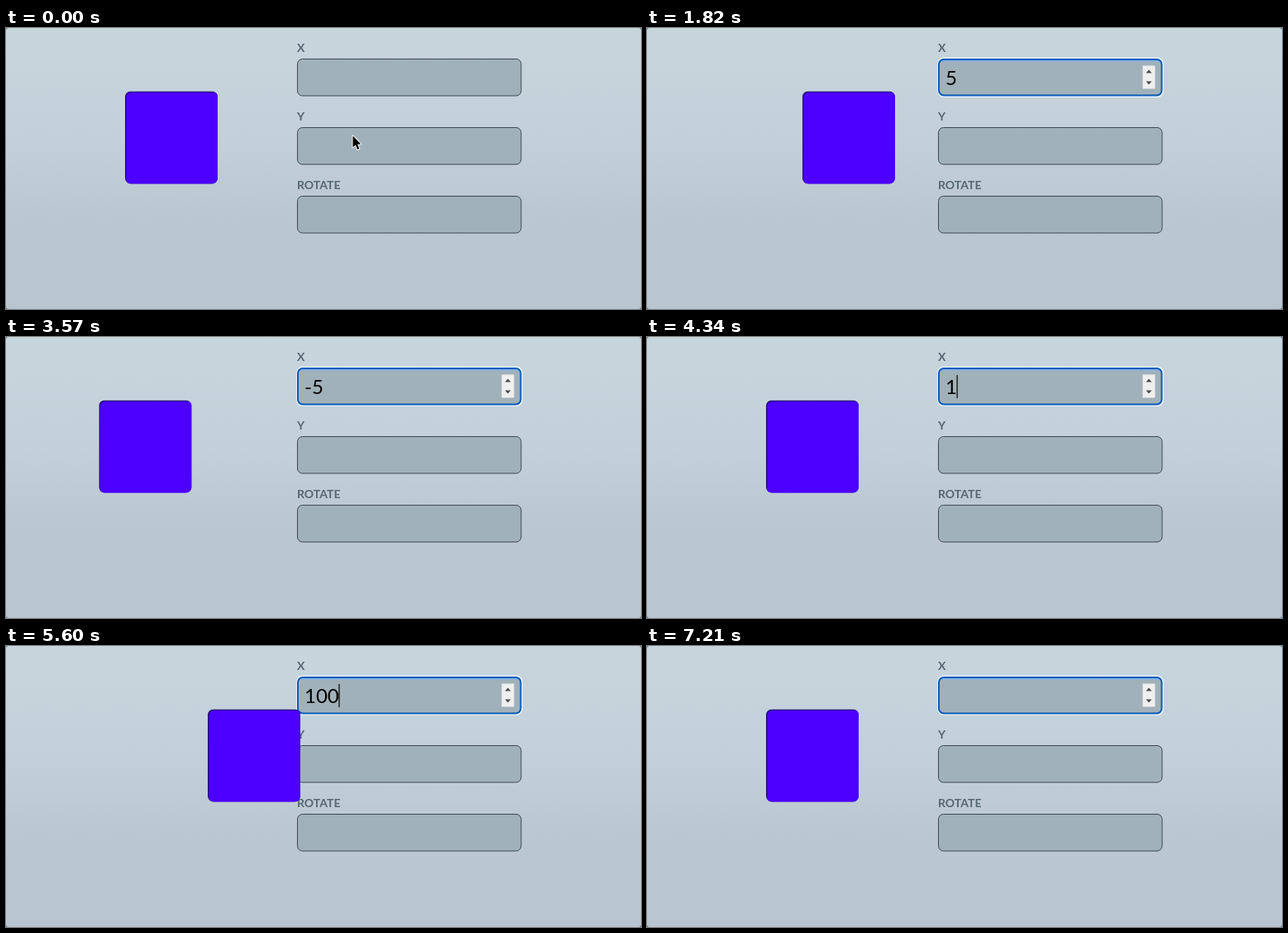
Animation of 768x340 px, one loop 7280 ms. Source, as an HTML page with a canvas:

```html
<!DOCTYPE html>
<html lang="en">
<head>
<meta charset="utf-8">
<title>Move a square by number</title>
<style>
  html, body { margin: 0; width: 768px; height: 340px; overflow: hidden; background: #56646d; }
  canvas { display: block; }
</style>
</head>
<body>
<canvas id="stage" width="768" height="340"></canvas>
<script>
const ctx = document.getElementById('stage').getContext('2d');
const LOOP = 7280, STEP = 70, MOVE = 500;
const LABELS = ['X', 'Y', 'ROTATE'];
const FIELD = { x: 352, y: 37, w: 271.5, h: 45.5, pitch: 83 };

// Each keystroke: time and the text it leaves in the first field
const KEYS = [
  [1120, '5'], [1230, '50'], [1805, '5'], [1890, ''],
  [2520, '-'], [2940, '-5'], [3000, '-50'], [3520, '-5'], [3660, '-'], [3800, ''],
  [4340, '1'], [4480, '10'], [4635, '100'], [5745, '10'], [5930, '1'], [6140, '']
];
const CARET = [[420, 910], [1120, 1770], [2240, 3560], [4060, 5110], [5600, 6230], [6720, 7210]];

const clamp = v => Math.max(0, Math.min(1, v));
const mix = (a, b, p) => a + (b - a) * p;
const easeInOut = p => p * p * (3 - 2 * p);
const backOut = p => 1 + (p - 1) ** 2 * (2.7 * (p - 1) + 1.7);

function offsetAt(t) {
  let from = 0, to = 0, start = -MOVE;
  const at = time => mix(from, to, backOut(clamp((time - start) / MOVE)));
  for (const [time, text] of KEYS) {
    if (time > t) break;
    const next = Number(text) || 0;
    if (next === to) continue;
    from = at(time);
    to = next;
    start = time;
  }
  return at(t);
}

function textAt(t) {
  let text = '';
  for (const [time, value] of KEYS) if (time <= t) text = value;
  return text;
}

function pointerAt(t) {
  if (t < 1120) return { x: mix(419.5, 418, clamp(t / 350)), y: mix(130.5, 60, easeInOut(clamp(t / 350))) };
  if (t < 6510 || t > 6790) return null;
  const p = clamp((t - 6440) / 350);
  return { x: mix(418, 352, p), y: mix(60, 345, p ** 1.3) };
}

function box(x, y, w, h, r) {
  ctx.beginPath();
  ctx.roundRect(x, y, w, h, r);
}

function polygon(points) {
  ctx.beginPath();
  points.forEach(([x, y]) => ctx.lineTo(x, y));
  ctx.closePath();
}

function drawBackground() {
  const shade = ctx.createLinearGradient(0, 0, 0, 340);
  shade.addColorStop(0, '#c7d5dd');
  shade.addColorStop(0.4, '#c3d0d9');
  shade.addColorStop(0.65, '#bbc8d2');
  shade.addColorStop(1, '#b8c5d0');
  ctx.fillStyle = '#56646d';
  ctx.fillRect(0, 0, 768, 340);
  ctx.fillStyle = shade;
  box(0, 0, 768, 340, 3);
  ctx.fill();
}

function drawSpinner(y) {
  ctx.fillStyle = '#efefef';
  ctx.fillRect(599.5, y + 8.5, 15, 28);
  ctx.fillStyle = '#4a4a4a';
  for (const [base, dir] of [[y + 17.5, -1], [y + 27.5, 1]]) {
    polygon([[603.5, base], [610.5, base], [607, base + 4 * dir]]);
    ctx.fill();
  }
}

function drawField(i, focused, hovered) {
  const { x, w, h } = FIELD, y = FIELD.y + i * FIELD.pitch;
  ctx.font = '700 14px Lato, sans-serif';
  ctx.fillStyle = '#566771';
  ctx.fillText(LABELS[i], x, y - 8);

  if (focused) {
    ctx.fillStyle = '#e6f0f8';
    box(x - 1, y - 1.5, w + 2.5, h + 3, 7.5);
    ctx.fill();
  }
  ctx.fillStyle = '#a1b1b9';
  box(x + 0.5, y + 0.5, w - 1, h - 1, 6);
  ctx.fill();
  if (focused) {
    ctx.fillStyle = '#86b0e0';
    ctx.fillRect(x + 4, y + 2, w - 8, 2);
  }
  ctx.strokeStyle = focused ? '#0b5cb8' : '#3c494f';
  ctx.lineWidth = focused ? 2 : 1;
  box(x + (focused ? 1 : 0.5), y + (focused ? 1 : 0.5), w - (focused ? 2 : 1), h - (focused ? 2 : 1), 6);
  ctx.stroke();
  if (focused || hovered) drawSpinner(y);
}

function drawValue(text, caret) {
  ctx.font = '24px Lato, sans-serif';
  ctx.fillStyle = '#000';
  ctx.fillText(text, 361, 69);
  if (caret) ctx.fillRect(360.6 + ctx.measureText(text).width, 46, 1.2, 28);
}

function drawSquare(x) {
  const y = 76.5, size = 112;
  ctx.save();
  box(x, y, size, size, 7);
  ctx.clip();
  ctx.fillStyle = '#220a78';
  ctx.fillRect(x, y, size, size);
  ctx.fillStyle = '#4c00ff';
  box(x + 1.4, y + 1.4, size, size, 6);
  ctx.fill();
  ctx.restore();
}

function drawPointer({ x, y }, beam) {
  ctx.save();
  ctx.translate(x, y);
  ctx.lineJoin = 'round';
  if (beam) {
    ctx.beginPath();
    for (const s of [-1, 1]) {
      ctx.moveTo(-3, 8 * s);
      ctx.quadraticCurveTo(0, 8 * s, 0, 5 * s);
      ctx.quadraticCurveTo(0, 8 * s, 3, 8 * s);
    }
    ctx.moveTo(0, -6);
    ctx.lineTo(0, 6);
    for (const [color, width] of [['#ffffffaa', 2.4], ['#111', 1]]) {
      ctx.strokeStyle = color;
      ctx.lineWidth = width;
      ctx.stroke();
    }
  } else {
    polygon([[0, 0], [0, 14], [3.2, 11], [5.6, 16.6], [7.9, 15.6], [5.5, 10.2], [9.8, 10]]);
    ctx.strokeStyle = '#fff';
    ctx.lineWidth = 1.8;
    ctx.stroke();
    ctx.fillStyle = '#000';
    ctx.fill();
  }
  ctx.restore();
}

function hoveredField(p) {
  if (!p || p.x < FIELD.x) return -1;
  const i = Math.floor((p.y - FIELD.y) / FIELD.pitch);
  return i < 3 && p.y - FIELD.y - i * FIELD.pitch < FIELD.h ? i : -1;
}

function draw(now) {
  const t = Math.floor((now % LOOP) / STEP) * STEP;
  const pointer = pointerAt(t);
  const hover = t ? hoveredField(pointer) : -1;

  drawBackground();
  LABELS.forEach((_, i) => drawField(i, i === 0 && t >= 420, i === hover));
  drawValue(textAt(t), CARET.some(([on, off]) => t >= on && t < off));
  drawSquare(144 + offsetAt(t));
  if (pointer) drawPointer(pointer, hover >= 0);
}

const begin = performance.now();
function tick() {
  draw(performance.now() - begin);
  requestAnimationFrame(tick);
}
tick();
</script>
</body>
</html>
```
